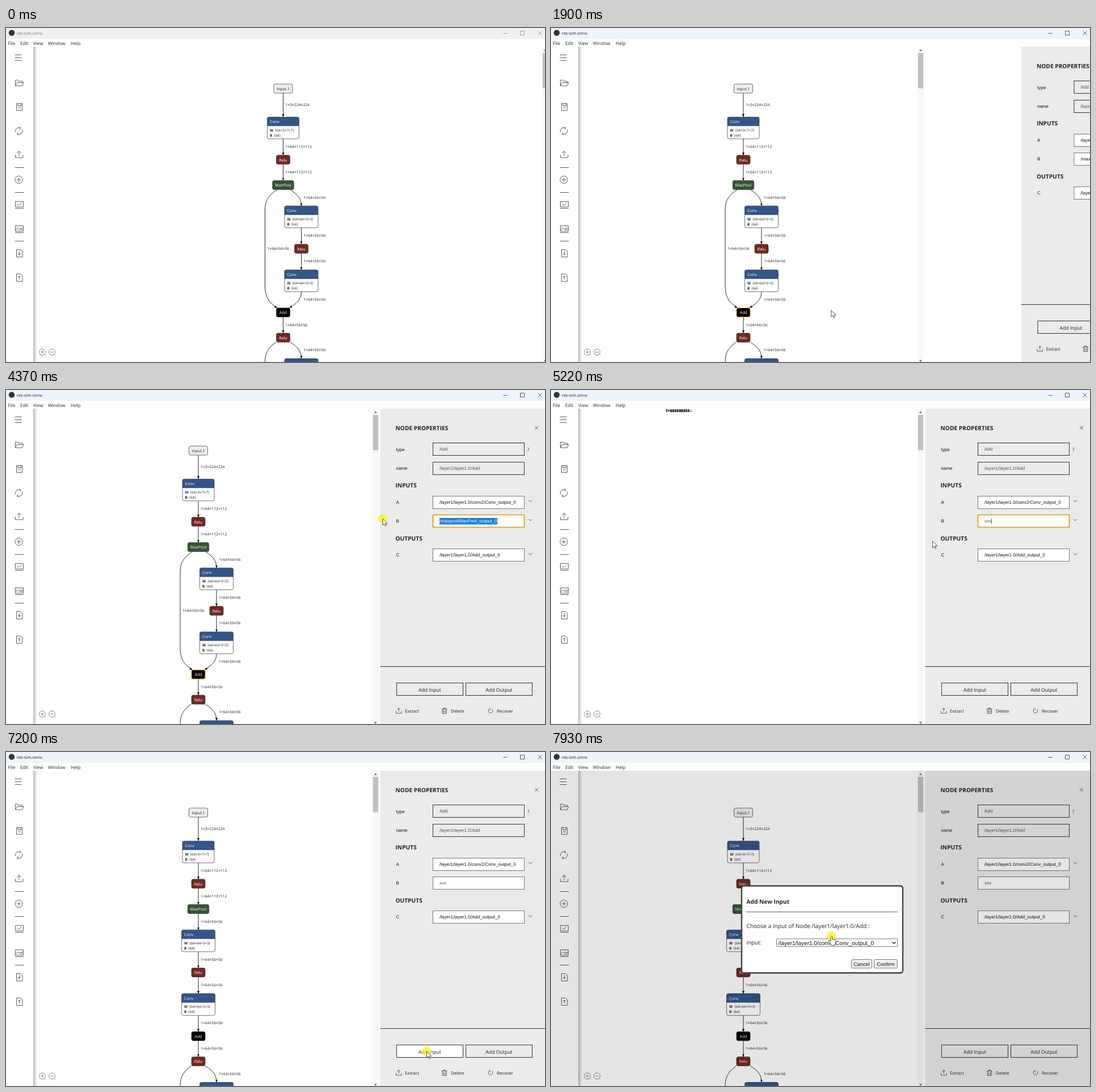
An HTML page that plays this animation: 950 by 590 pixels, repeating every 8000 ms.

```html
<!DOCTYPE html>
<html lang="en">
<head>
<meta charset="utf-8">
<title>Graph editor</title>
<style>
html, body { margin: 0; width: 100%; height: 100%; overflow: hidden; background: #fff; }
#stage { display: block; width: 950px; height: 590px; }
text { font-family: "Open Sans", "Noto Sans", sans-serif; fill: #222; white-space: pre; text-rendering: geometricPrecision; }
.arial { font-family: "Liberation Sans", Arial, sans-serif; fill: #111; }
.bold { font-weight: 700; }
.mid { text-anchor: middle; }
.white { fill: #fff; }
.soft { fill: #555; }
.edge { fill: none; stroke: #111; stroke-width: .9; marker-end: url(#tip); }
.icon { fill: none; stroke: #555b66; stroke-width: 1; }
.thin { fill: none; stroke: #333; stroke-width: .8; }
.node { stroke: #333; stroke-width: .7; }
.picked .add rect { stroke: #e8a200; stroke-width: 1; }
.hover .add rect { fill: #fff; stroke: #555; }
.hover .add text { fill: #222; }
.blur .title text { fill: #777; }
.blur .title path { stroke: #8a8a8a; }
</style>
</head>
<body>
<svg id="stage" viewBox="0 0 950 590" xmlns="http://www.w3.org/2000/svg"></svg>
<script>
const LOOP = 8000;
const stage = document.getElementById('stage');

// Text whose visual middle sits at cy
const text = (x, cy, s, size, cls = '', attrs = '') =>
  `<text x="${x}" y="${cy + size * .35}" font-size="${size}" class="${cls}" ${attrs}>${s}</text>`;
const rect = (x, y, w, h, attrs = '') =>
  `<rect x="${x}" y="${y}" width="${w}" height="${h}" ${attrs}/>`;
const path = (d, cls = 'icon', attrs = '') => `<path d="${d}" class="${cls}" ${attrs}/>`;
const group = (id, body) => `<g id="${id}">${body}</g>`;

// ---- graph ----
const COLORS = { Relu: '#702921', MaxPool: '#335533', Add: '#000' };
const edge = d => path(d, 'edge');
const label = (x, y, s) => text(x, y, s, 6.75);

function pill(cx, cy, name, w = 24) {
  const box = rect(cx - w / 2, cy - 8, w, 16, `rx="3" class="node" fill="${COLORS[name] || '#eee'}"`);
  const cls = COLORS[name] ? 'mid white' : 'mid';
  return `<g class="${name.toLowerCase()}">${box}${text(cx, cy + .5, name, 7, cls)}</g>`;
}

function conv(cx, y, shape, w = 59) {
  const x = cx - w / 2, dims = s => `⟨${s}⟩`;
  return rect(x, y, w, 38.5, 'rx="3" fill="#fff"') +
    `<path d="M${x} ${y + 16}v-13q0-3 3-3h${w - 6}q3 0 3 3v13z" fill="#335588"/>` +
    rect(x, y, w, 38.5, 'rx="3" class="node" fill="none"') +
    text(x + 4.5, y + 8.7, 'Conv', 7.1, 'white') +
    text(x + 4.5, y + 23, 'W', 6.3, 'bold') + text(x + 13.5, y + 23, dims(shape), 6.3) +
    text(x + 4.5, y + 32.2, 'B', 6.3, 'bold') + text(x + 11.5, y + 32.2, dims('64'), 6.3);
}

function graph(chain) {
  const c = 488.5, r = chain ? c : 520.5, s = chain ? -.5 : 0, shape = '1×64×56×56';
  const fork = y => `M501 ${y}C514 ${y + 9} 520.5 ${y + 15} 520.5 ${y + 29}`;
  const down = (x, y1, y2) => edge(`M${x} ${y1}V${y2}`);
  let out = down(c, 115, 157) + down(c, 196, 225) + down(c, 241, 269.5) +
    down(r, 353, 382 + s) + down(r, 398 + s, 427.5 + s) + down(c, 510.5 + s, 539 + s);
  if (chain) {
    out += down(c, 285.5, 314.5) + down(c, 465.5, 494);
  } else {
    out += edge(fork(285.5)) +
      edge('M478 285.5C462 296 456.5 305 456.5 322V454C456.5 474 462 484 478 494.5') +
      edge('M520.5 466C520.5 478 514 485 499.5 494.5') + label(460.5, 390, shape);
  }
  out += edge(fork(555 + s)) + `<path d="M476 ${555 + s}C460 566 456.5 576 456.5 592" class="edge" style="marker-end:none"/>`;
  out += label(c + 4, 136, '1×3×224×224') + label(c + 4, 210, '1×64×112×112') + label(c + 4, 255, '1×64×112×112');
  for (const y of [299.5, 367 + s, 412 + s, 479.5 + s]) out += label(r + 4, y, shape);
  out += label(c + 4, 524.5 + s, shape) + label(524.5, 569 + s, shape);
  out += pill(c, 107, 'input.1', 33) + conv(c, 157.3, '64×3×7×7', 56) + pill(c, 232.7, 'Relu') +
    pill(c, 277.5, 'MaxPool', 37.5) + conv(r, 314.3, '64×64×3×3') + pill(r, 390 + s, 'Relu') +
    conv(r, 427.3 + s, '64×64×3×3') + pill(c, 502.5 + s, 'Add') + pill(c, 547 + s, 'Relu') +
    conv(520.5, 584 + s, '64×64×3×3');
  return out;
}

const loose = ['3×224×224', '64×112×112', '64×56×56', '128×28×28', '256×14×14', '512×7×7']
  .map(s => text(202, 37, '1×' + s, 6.75)).join('');

// ---- window chrome ----
const titleBar = rect(0, 0, 950, 19.5, 'id="strip"') + '<circle cx="10" cy="8.5" r="5.2" fill="#2e3638"/>' +
  '<g class="title">' + text(19, 9.5, 'res-sim.onnx', 7.5) +
  path('M876.5 9.5h7M906.5 5.5h7v7h-7zM937.5 5.5l7 7m0-7l-7 7', 'thin') + '</g>';
const menu = rect(0, 19.5, 950, 13.5, 'fill="#fff"') +
  [[3.5, 'File'], [25, 'Edit'], [48, 'View'], [74, 'Window'], [114, 'Help']]
    .map(([x, s]) => text(x, 26.7, s, 8.1)).join('');

const sheet = y => `M18.5 ${y}h7l3.5 3.5v9.5h-10.5z`;
const screen = y => `M16.5 ${y}h14v9.5h-14zM16 ${y + 12}h15`;
const tools = rect(48, 33, 7, 557, 'fill="url(#shade)"') + rect(0, 33, 48, 557, 'fill="#fff"') + path(
  'M15.5 47.5h12M15.5 52.5h12M15.5 57.5h12' +
  'M16.5 102v-10h5l1.5 2h6v2.5M16.5 102l3-5.5h11.5l-2.5 5.5z' +
  'M18.5 133.5h10v12h-10zM21 133.5v4h5.5v-4M21 141h5' +
  'M16.5 184a6.3 6.3 0 0 1 9-7.3M28.8 179.5a6.3 6.3 0 0 1-9 7.6M23.5 175l2.5 1.7-1.5 2.6M22 189l-2.5-1.8 1.6-2.6' +
  'M16.5 224v5h13.5v-5M23 226v-8.5M19.5 221l3.5-3.5 3.5 3.5' +
  'M15.5 246.5h16M15.5 290.5h16M15.5 376.5h16' +
  'M16 268a6.6 6.6 0 1 0 13.2 0a6.6 6.6 0 1 0-13.2 0M19 268h7.2M22.6 264.4v7.2' +
  screen(306.5) + 'M20 311l2.5 2.5 4.5-4.5' +
  screen(349.5) + 'M17 357l4-4 3 3 2-2M25 352.5l5 5m0-5l-5 5' +
  sheet(391.5) + 'M23.5 394.5v6M21 398l2.5 2.5 2.5-2.5' +
  sheet(434.5) + 'M23.5 444v-6M21 440.5l2.5-2.5 2.5 2.5');
const GREY = 'style="stroke:#666"';
const lens = x => `<circle cx="${x}" cy="572.5" r="5.5" class="thin" ${GREY}/>` +
  path(`M${x - 2.7} 572.5h5.4M${x + 4} 576.5l2 2`, 'thin', GREY);
const zoom = lens(64) + path('M64 569.8v5.4', 'thin', GREY) + lens(81);

const scrollBar = rect(945, 33, 11, 557, 'fill="#f8f8f8"') + rect(945.8, 44, 9.4, 62.5, 'fill="#c1c1c1"') +
  '<path d="M947.8 40.5h5l-2.5-3zM947.8 586.5h5l-2.5 3z" fill="#555"/>';

// ---- properties panel ----
const field = (y, s, off) =>
  rect(752.5, y, 161, 22, off ? 'fill="#ebebeb" stroke="#333"' : 'fill="#fff" stroke="#777"') +
  text(764, y + 11, s, 8, off ? 'arial soft' : 'arial');
const chevron = y => path(`M921 ${y - 1.5}l3.2 3 3.2-3`, 'thin');
const button = (id, x, s) => rect(x, 517.5, 117, 22, `id="${id}" fill="#ebebeb" stroke="#333"`) +
  text(x + 58.5, 529.8, s, 8.7, 'mid');
const LINK = '/maxpool/MaxPool_output_0';
const marked = '<svg id="marked" y="226" height="11.5">' + rect(0, 0, 110, 12, 'fill="#1a7fdc"') +
  group('inner', text(0, 5.5, LINK, 8, 'arial', 'style="fill:#fff"')) + '</svg>';
const panel = rect(659.5, 33, 291, 557, 'fill="#ebebeb"') +
  text(686.5, 67.8, 'NODE PROPERTIES', 10.2, 'bold') + text(686.5, 168.5, 'INPUTS', 10.2, 'bold') +
  text(686.5, 262, 'OUTPUTS', 10.2, 'bold') + path('M932 63.7l6 6m0-6l-6 6', 'thin') +
  [['type', 105], ['name', 138.5], ['A', 198], ['B', 231.5], ['C', 291.5]]
    .map(([s, y]) => text(687.5, y, s, 8, 'arial')).join('') +
  field(93.5, 'Add', true) + field(127.5, '/layer1/layer1.0/Add', true) + text(919, 105, '?', 8) +
  field(187.5, '/layer1/layer1.0/conv2/Conv_output_0') + chevron(196) +
  rect(752.5, 220.5, 161, 22, 'id="frame" fill="#fff"') + text(764, 231.5, '', 8, 'arial', 'id="value"') +
  marked + path('M776.5 227v9.5', 'thin', 'id="caret"') + group('chevB', chevron(229.5)) +
  field(280.5, '/layer1/layer1.0/Add_output_0') + chevron(290) +
  path('M659.5 488.5H950', 'thin', 'style="stroke-width:1"') +
  button('addIn', 688.5, 'Add Input') + button('addOut', 810.5, 'Add Output') +
  path('M687.5 567v4h9.5v-4M692.2 568v-6M689.5 564.5l2.7-2.7 2.7 2.7', 'thin') +
  path('M768 563.5h9.5M771 563.5v-1.7h3.5v1.7M769 564l.6 7.5h6.3l.6-7.5M771.3 565.5v4.5M774.2 565.5v4.5', 'thin') +
  path('M851.5 563.7a3.8 3.8 0 1 0 4.8-.1M854 561.5l-2.7 2.2 2.7 1.8', 'thin') +
  text(703, 567.3, 'Extract', 7.8) + text(784, 567.3, 'Delete', 7.8) + text(865, 567.3, 'Recover', 7.8);

// ---- dialog ----
const small = (x, w, s) => rect(x, 366.5, w, 15.3, 'rx="2" fill="#efefef" stroke="#767676"') +
  text(x + w / 2, 374.7, s, 9, 'arial mid');
const dialog = rect(0, 33, 950, 557, 'fill-opacity=".1"') +
  rect(336, 236.5, 284, 153.8, 'rx="4" fill="#fff" stroke="#444" stroke-width="2.4"') +
  text(344.5, 264.3, 'Add New Input', 10.2, 'bold') + path('M344 282.5h267', 'thin') +
  text(344.5, 307, 'Choose a input of Node /layer1/layer1.0/Add :', 10.2) + text(344.5, 337, 'input:', 9.8) +
  rect(397.5, 330, 213, 13.7, 'rx="1" fill="#fff" stroke="#767676"') +
  text(400.5, 337, '/layer1/layer1.0/conv2/Conv_output_0', 10, 'arial') +
  path('M601.5 335.5l3 3 3-3', 'thin', 'style="stroke-width:1.5"') +
  small(529.5, 36, 'Cancel') + small(569.5, 41, 'Confirm');

// ---- pointers, all with the hot spot at 0,0 ----
const pointers = '<circle id="glow" r="8.2" fill="#fbf42a" fill-opacity=".8"/>' +
  '<path id="arrow" d="M0 0V11.3L2.7 8.8 4.5 12.8 6.3 12 4.6 8.1H8.2z" fill="#fff" stroke="#222" stroke-width=".8"/>' +
  '<path id="hand" d="M0 .4c1-.8 2 0 2 1v5c.5-.9 1.8-.8 2 .2.6-.7 1.8-.5 2 .5.7-.5 1.9 0 1.9 1v3.4q0 2-1.4 3.2v1.8H-.4v-1.7C-2 13-3.8 10.5-4.9 9c-.4-1.2 1-1.7 1.9-1L-.9 9.7V1.4z" fill="#fff" stroke="#222" stroke-width=".8"/>' +
  '<path id="beam" d="M-2.5-5.5h1.7q.8 0 .8.8 0-.8.8-.8h1.7M0-4.7v9.4M-2.5 5.5h1.7q.8 0 .8-.8 0 .8.8.8h1.7" class="thin"/>';

stage.innerHTML = `<defs>
  <marker id="tip" viewBox="0 0 5 4" refX="5" refY="2" markerWidth="5" markerHeight="4" markerUnits="userSpaceOnUse" orient="auto"><path d="M0 0L5 2L0 4z"/></marker>
  <linearGradient id="shade"><stop stop-color="#bbb"/><stop offset="1" stop-color="#fff"/></linearGradient>
</defs>` + rect(0, 0, 950, 590, 'fill="#fff"') +
  group('fork', graph(false)) + group('chain', graph(true)) + group('loose', loose) +
  group('bar', scrollBar) + tools + zoom + group('panel', panel) + titleBar + menu +
  group('dialog', dialog) + group('pointer', pointers);

// ---- timeline ----
const $ = id => document.getElementById(id);
const show = (id, on) => $(id).setAttribute('display', on ? 'inline' : 'none');
const move = (id, x, y = 0) => $(id).setAttribute('transform', `translate(${x} ${y})`);
const within = (t, a, b) => t >= a && t < b;
const inBox = (x, y, l, t, r, b) => x > l && x < r && y > t && y < b;

const ROUTE = [
  [70, 760, 562], [490, 697, 437], [810, 697, 437], [1500, 494, 499], [1900, 494, 499],
  [2490, 626, 386], [2580, 626, 386], [2710, 768, 301], [2840, 768, 301], [3050, 768, 296],
  [3180, 768, 296], [4020, 873, 231], [4070, 873, 231], [4350, 664, 227.5], [4820, 664, 227.5],
  [5150, 672.5, 267], [5290, 672.5, 267], [5640, 528, 314], [5700, 528, 314], [6400, 340, 505],
  [6550, 340, 505], [7130, 741.5, 529], [7290, 741.5, 529], [7930, 494, 325], [LOOP, 494, 325]
];
const CLICKS = [[1755, 1830], [4010, 4440], [6450, 6560], [7130, 7310], [7860, LOOP]];

function pointerAt(t) {
  const i = Math.max(1, ROUTE.findIndex(k => k[0] > t));
  const [t0, x0, y0] = ROUTE[i - 1], [t1, x1, y1] = ROUTE[i];
  const u = Math.max(0, (t - t0) / (t1 - t0)), e = u * u * (3 - 2 * u);
  return [x0 + (x1 - x0) * e, y0 + (y1 - y0) * e];
}

function render(t) {
  const [x, y] = pointerAt(t);
  const open = t >= 1830, asking = t >= 7265, gone = within(t, 4600, 5430), rewired = t >= 5430;
  const dx = open ? -149.5 : 0;

  $('strip').setAttribute('fill', t < 280 ? '#eef2f5' : t < 1900 ? '#f3f3f3' : '#eff4fa');
  show('fork', !gone && !rewired);
  show('chain', rewired);
  show('loose', gone);
  move('fork', dx);
  move('chain', dx);
  move('bar', 2 * dx);

  show('panel', open);
  move('panel', 291 * (1 - Math.min(1, Math.max(0, (t - 1830) / 170))));
  const focus = within(t, 4065, 5560), typed = t >= 4600;
  const frame = $('frame');
  frame.setAttribute('stroke', focus ? '#e59700' : '#777');
  frame.setAttribute('stroke-width', focus ? 1.7 : 1);
  frame.setAttribute('rx', focus ? 2 : 0);
  const count = t < 4740 ? 1 : t < 4890 ? 2 : 3;
  $('value').textContent = typed ? 'x'.repeat(count) : LINK;
  $('value').style.fill = typed ? '#555' : '#111';
  show('caret', focus && typed);
  move('caret', 4 * (count - 3));
  show('chevB', t < 6520);

  // Drag selection grows leftwards from the end of the value
  const from = Math.min(866, Math.max(764, x));
  show('marked', focus && !typed);
  $('marked').setAttribute('x', from);
  $('marked').setAttribute('width', 866 - from);
  move('inner', 764 - from);

  const hover = !gone && !asking && inBox(x, y, 476.5 + dx, 494, 500.5 + dx, 511);
  const overField = open && !asking && (inBox(x, y, 752, 220, 914, 243) || inBox(x, y, 752, 280, 914, 303));
  const hand = hover || asking && inBox(x, y, 397, 320, 611, 345);
  $('addIn').setAttribute('fill', !asking && inBox(x, y, 688, 518, 805, 540) ? '#fff' : '#ebebeb');
  stage.classList.toggle('hover', hover);
  stage.classList.toggle('picked', within(t, 1830, 4600));
  stage.classList.toggle('blur', t < 280);

  show('dialog', asking);
  show('pointer', t >= 70);
  move('pointer', x, y);
  show('glow', CLICKS.some(([a, b]) => within(t, a, b)));
  show('hand', hand);
  show('beam', overField);
  show('arrow', !hand && !overField);
}

const start = performance.now();
function tick() {
  render((performance.now() - start) % LOOP);
  requestAnimationFrame(tick);
}
tick();
</script>
</body>
</html>
```
